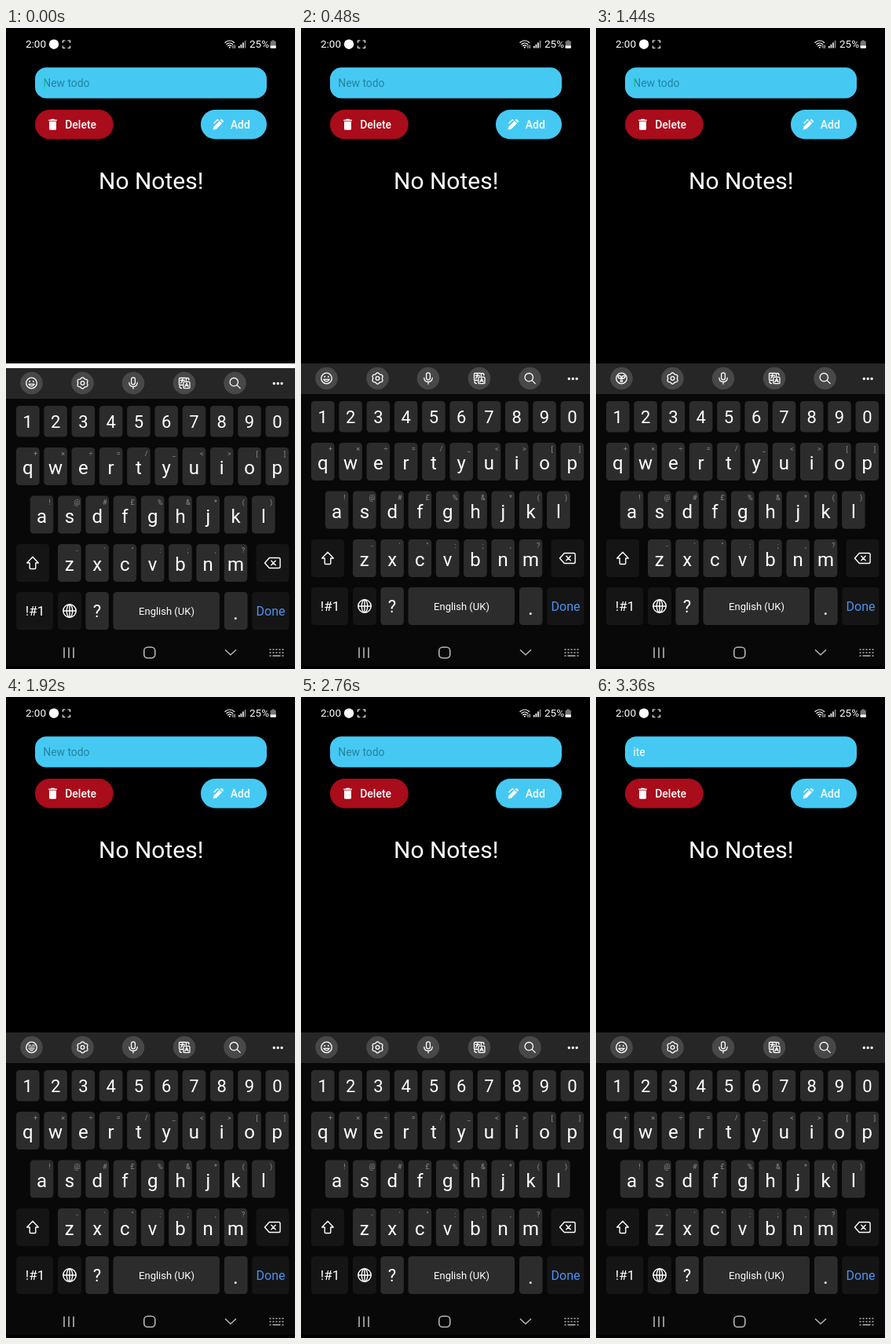
These frames come from a looping animation (368x816 px, 3480 ms). An HTML page:

```html
<!DOCTYPE html>
<html lang="en">
<head>
<meta charset="utf-8">
<title>Todo app</title>
<style>
html, body { margin: 0; width: 100%; height: 100%; overflow: hidden; background: #000; }
svg { display: block; width: 368px; height: 816px; font-family: Roboto, sans-serif; fill: #fff; }
.line { fill: none; stroke: #fff; stroke-width: 1.3; stroke-linecap: round; stroke-linejoin: round; }
.nav { fill: none; stroke: #b4b4b4; stroke-width: 1.6; }
.mid { text-anchor: middle; }
.key { fill: #2c2c2c; }
.dark { fill: #151515; }
.hint { fill: #8c8c8c; font-size: 9px; text-anchor: middle; }
.label { font-size: 14px; font-weight: 500; }
</style>
</head>
<body>
<svg viewBox="0 0 368 816">
  <!-- status bar -->
  <g font-size="13.5">
    <text x="25" y="25.3">2:00</text>
    <text x="310" y="25.3">25%</text>
  </g>
  <circle cx="61" cy="20.7" r="6.2"/>
  <path class="line" style="stroke-width:1.1" d="M72.5 18.5v-2.5h2.5M79 16h2.5v2.5M81.500 23v2.500h-2.500M75 25.500h-2.500v-2.500"/>
  <rect id="cast" class="line" x="74.800" y="19.200" width="4.600" height="3.600" rx=".6"/>
  <g class="line" style="stroke-width:1.2">
    <path d="M279 18.500q5.800-5 11.600 0M280.800 20.700q4-3.400 8 0M282.700 22.800q2.100-1.700 4.200 0"/>
    <path d="M289 22v3.500M291.300 25.500v-3.500" stroke-width=".9"/>
  </g>
  <circle cx="284.800" cy="24.700" r="1"/>
  <path d="M296 23h1.600v2.500h-1.600zM298.600 21h1.600v4.500h-1.600zM301.200 18.500h1.600v7h-1.600z"/>
  <path d="M303.800 16h1.600v9.500h-1.600z" fill="#888"/>
  <path d="M338.700 15.500h3v1.300h1.300q.8 0 .8.8v7.400q0 .8-.8.8h-5.600q-.8 0-.8-.8v-7.400q0-.8.8-.8h1.300z" fill="#777"/>
  <path d="M336.600 22.500h7.200v2.500q0 .8-.8.8h-5.600q-.8 0-.8-.8z"/>

  <!-- app -->
  <rect x="37" y="50.300" width="295" height="39.200" rx="14.500" fill="#45c9f3"/>
  <text id="field" x="47.300" y="75.300" font-size="13.900"></text>
  <rect id="caret" y="61.500" width="1.500" height="18" fill="#20dfb0"/>
  <rect x="37" y="104" width="99.700" height="37.500" rx="18.500" fill="#a90c1a"/>
  <path d="M55 119h9v9.300q0 1.500-1.500 1.500h-6q-1.500 0-1.500-1.500zM54.200 116.700h2.700l.8-.9h3.600l.8.9h2.700v1.500h-10.600z"/>
  <text class="label" x="75.200" y="128">Delete</text>
  <rect x="248" y="104" width="84" height="37.500" rx="18.500" fill="#45c9f3"/>
  <path d="M263.500 129.500l1-4 7.300-7.300 3.200 3.200-7.300 7.300zM272.600 117.400l1-1q.8-.7 1.600 0l1.600 1.600q.7.800 0 1.600l-1 1z"/>
  <path d="M264.500 121.500l4.700-4.700 1.500 1" fill="none" stroke="#fff" stroke-width="1.300"/>
  <text class="label" x="285.700" y="128">Add</text>
  <text class="mid" x="184.700" y="204.800" font-size="30">No Notes!</text>

  <!-- keyboard -->
  <rect y="427" width="368" height="20" fill="#fff"/>
  <rect y="466" width="368" height="346" fill="#080808"/>
  <g id="board">
    <rect y="427" width="368" height="39" fill="#262626"/>
    <g id="bubbles" fill="#484848"></g>
    <g class="line">
      <circle cx="32.500" cy="446" r="6.800"/>
      <g id="smile">
        <path d="M28.800 447.300q3.700 5.200 7.400 0z"/>
        <path d="M30.200 443.800v.3M34.800 443.800v.3" stroke-width="1.800"/>
      </g>
      <g id="love">
        <path d="M32 446.500q-4.300-.6-4-3 .8-1.800 2.300-.4 1.800-.8 1.700 3.400zM33 446.500q4.300-.6 4-3-.8-1.800-2.300-.4-1.800-.8-1.700 3.400z"/>
        <circle cx="32.500" cy="449.300" r="1.200"/>
      </g>
      <path id="gear"/>
      <circle cx="97.500" cy="446" r="2.300"/>
      <rect x="159.600" y="438.800" width="4.800" height="9" rx="2.400"/>
      <path d="M156.800 445.500q.2 5 5.200 5t5.200-5M162 450.500v2.700"/>
      <path d="M225 448.500h-3.500q-1 0-1-1v-7q0-1 1-1h7q1 0 1 1v2.500M222.300 442.500h5M224.800 441v1.500q-.5 2.500-2.300 3.500M230.500 439.500q2.500 0 2.500 2.500M221 450q0 2.500 2.500 2.500"/>
      <rect x="226" y="444.300" width="8" height="8.300" rx="1.200"/>
      <path d="M227.900 450.700l2.100-4.700 2.100 4.700M228.600 449.300h2.800"/>
      <circle cx="290.300" cy="444.700" r="5.200"/>
      <path d="M294.200 448.600l4 4"/>
    </g>
    <path d="M341.300 446.500h0M346.200 446.500h0M351.100 446.500h0" stroke="#fff" stroke-width="3.400" stroke-linecap="round"/>
    <g id="keys"></g>
    <g class="line" style="stroke-width:1.400">
      <path d="M34 667.300l7.300 7.700h-3.500v6.500q0 1-1 1h-5.600q-1 0-1-1v-6.500h-3.500z"/>
      <path d="M335.300 668.500h12q1.800 0 1.800 1.800v9.400q0 1.800-1.800 1.800h-12l-5.800-6.500zM337.800 672.300l5.400 5.400M343.200 672.300l-5.400 5.400"/>
      <circle cx="81" cy="736" r="8.200"/>
      <ellipse cx="81" cy="736" rx="3.700" ry="8.200"/>
      <path d="M72.800 736h16.400M81 727.800v16.400"/>
    </g>
  </g>

  <!-- navigation bar -->
  <g class="nav">
    <path d="M74 788.500v13.500M80 788.500v13.500M86 788.500v13.500"/>
    <rect x="175.800" y="788.300" width="14" height="13.700" rx="4.500"/>
    <path d="M279 791.500l7 6.500 7-6.500"/>
    <path d="M335.500 791.300h18M335.500 795.300h18" stroke-dasharray="2 2"/>
    <path d="M335.500 799.300h2M339.500 799.300h10M351.500 799.300h2"/>
  </g>
</svg>
<script>
const $ = id => document.getElementById(id);
const PITCH = 35.28, LOOP = 3480;

$('bubbles').innerHTML = [32.5, 97.5, 162, 227, 291.5]
  .map(x => `<circle cx="${x}" cy="446" r="14.3"/>`).join('');

// Cog outline: a circle whose radius swells in six lobes
let cog = '';
for (let i = 0; i < 48; i++) {
  const a = i * Math.PI / 24, r = 6.5 + 0.7 * Math.cos(6 * a + Math.PI);
  cog += `${i ? 'L' : 'M'}${(97.5 + r * Math.cos(a)).toFixed(1)} ${(446 + r * Math.sin(a)).toFixed(1)}`;
}
$('gear').setAttribute('d', cog + 'Z');

const esc = s => s.replace(/&/g, '&amp;').replace(/</g, '&lt;');
const box = (x, y, w, h, kind = 'key') =>
  `<rect class="${kind}" x="${x}" y="${y}" width="${w}" height="${h}" rx="4.5"/>`;
const text = (s, x, y, size, color = '#fff') =>
  `<text class="mid" x="${x}" y="${y}" font-size="${size}" fill="${color}">${s}</text>`;

function row(chars, hints, x, y, h, size, base) {
  return [...chars].map((c, i) => {
    const left = x + i * PITCH;
    return box(left, y, 29.6, h) + text(c, left + 14.8, y + base, size) +
      (hints ? `<text class="hint" x="${left + 24.5}" y="${y + 11}">${esc(hints[i])}</text>` : '');
  }).join('');
}

$('keys').innerHTML =
  row('1234567890', '', 13, 475, 39.5, 22, 28) +
  row('qwertyuiop', '+×÷=/_<>[]', 13, 528, 48, 24, 34.3) +
  row('asdfghjkl', '!@#£%&*()', 30.8, 589.5, 48, 24, 34.3) +
  row('zxcvbnm', '-\'":;,?', 66, 651, 48, 24, 34.3) +
  box(13, 651, 42, 48, 'dark') + box(318.5, 651, 42, 48, 'dark') +
  box(13, 712, 47, 48, 'dark') + box(66, 712, 30, 48, 'dark') +
  box(101.3, 712, 29.6, 48) + box(136.5, 712, 135.5, 48) +
  box(278, 712, 29.6, 48) + box(313.2, 712, 47.3, 48, 'dark') +
  text('!#1', 37, 742, 17) + text('?', 116, 744, 22) +
  text('English (UK)', 204.5, 741, 13) + text('.', 292.5, 747, 26) +
  text('Done', 337, 742, 16, '#4b92f2');

const within = (t, spans) => spans.some(([a, b]) => t >= a && t < b);
const ramp = (t, a, b) => Math.min(1, Math.max(0, (t - a) / (b - a)));
const castOn = [[120, 480], [1560, 1920], [2880, 3240]];
const caretOn = [[0, 120], [600, 1080], [1440, 1920], [2280, 2760], [2880, 3360]];

function draw(now) {
  const t = now % LOOP;
  const typed = t < 2880 ? '' : 'ite'.slice(0, 1 + Math.floor((t - 2880) / 240));
  const field = $('field');
  field.textContent = typed || 'New todo';
  field.setAttribute('fill', typed ? '#fff' : '#25839f');

  $('caret').setAttribute('x', 47.6 + [0, 3, 7.7, 15][typed.length]);
  $('caret').setAttribute('opacity', within(t, caretOn) ? 1 : 0);
  $('cast').setAttribute('opacity', within(t, castOn) ? 1 : 0);

  const love = ramp(t, 540, 780) - ramp(t, 1740, 2040);
  $('love').setAttribute('opacity', love);
  $('smile').setAttribute('opacity', 1 - love);
  $('board').setAttribute('transform', `translate(0 ${t < 120 ? 6 : 0})`);
  requestAnimationFrame(() => draw(performance.now() - start));
}
const start = performance.now();
draw(0);
</script>
</body>
</html>
```
